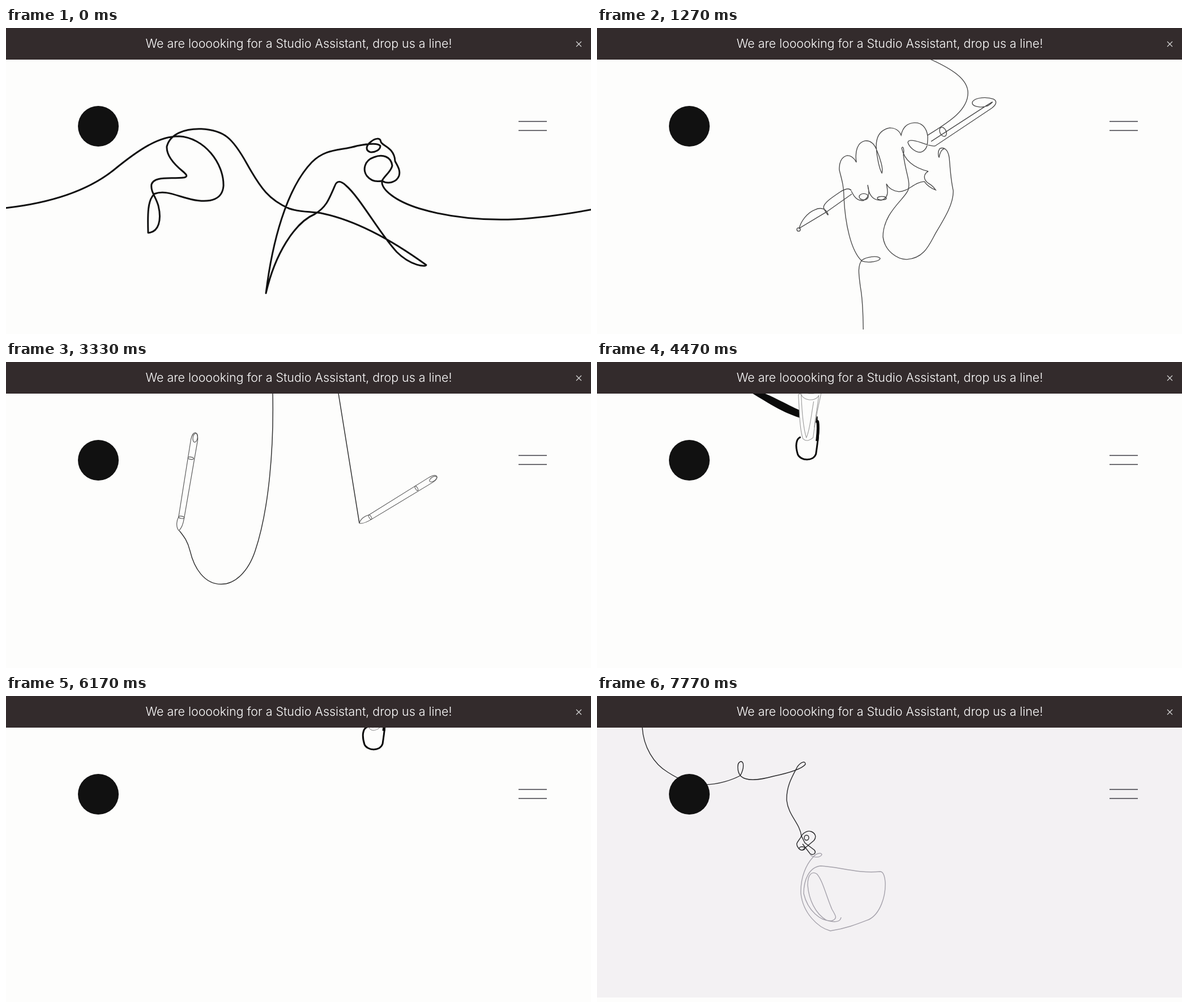
An HTML page for the animation above (7.83 s loop, 1033x542 px).

```html
<!DOCTYPE html>
<html lang="en">
<head>
<meta charset="utf-8">
<title>Studio page</title>
<style>
  html, body { margin: 0; height: 100%; overflow: hidden; background: #fdfdfc; }
  svg { display: block; width: 100%; height: 100%; fill: none; }
  text { font: 300 21.4px Inter, "Open Sans", sans-serif; fill: #fff; text-anchor: middle; }
  #hero { stroke: #111; stroke-width: 3; stroke-linejoin: round; }
  #hand { stroke: #484848; stroke-width: 1.35; }
  #pens { stroke: #333; stroke-width: 1.5; }
  #pencil { stroke: #555; stroke-width: 1.15; }
  #brush { stroke: #999; stroke-width: 1.1; }
  #lamp { stroke: #2a2a2c; stroke-width: 1.4; }
</style>
</head>
<body>
<svg viewBox="0 0 1033 542">
  <defs>
    <clipPath id="view"><rect y="56" width="1033" height="478"/></clipPath>
    <clipPath id="painted"><rect id="wipe" y="-100" width="0" height="700"/></clipPath>
    <g id="pencil">
      <path d="M0,0 C-7,-7 -6,-18 -4,-24 L-4,-163 C-3,-180 7,-180 8,-163 L6,-24 C6,-14 4,-4 0,0"/>
      <ellipse cx="3" cy="-167" rx="4" ry="8"/>
      <ellipse cx="1" cy="-130" rx="5" ry="2"/>
      <ellipse cx="1" cy="-24" rx="5" ry="2"/>
    </g>
  </defs>

  <g clip-path="url(#view)">
    <rect id="paper" y="56" width="1033" height="478" fill="#f3f1f3"/>

    <path id="hero" d="M0,319 C70,311 140,292 190,252 C235,215 270,192 305,192 C350,194 385,240 384,280
      C382,305 360,308 340,306 C310,303 285,285 262,294 C250,305 250,330 251,363
      C270,362 275,340 269,315 C264,298 255,290 257,277 C262,262 290,268 315,265
      C322,263 318,259 312,254 C295,240 283,225 284,210 C290,188 315,178 345,179
      C385,181 400,195 425,240 C450,285 465,305 500,320 C520,327 540,325 560,329
      C620,342 680,375 742,420 C742,424 715,422 690,397 C660,365 625,300 600,279
      C590,270 584,271 581,279 C570,305 565,318 545,330 C510,345 475,400 459,470
      C470,380 495,285 540,238 C565,213 590,218 620,209 C640,205 657,204 661,209
      C661,216 652,221 643,220 C634,217 636,208 644,202 C652,195 661,194 662,202
      C664,209 686,212 687,236 C691,244 697,252 694,262 C690,273 675,278 664,271
      C668,262 680,255 682,244 C680,228 665,223 650,229 C632,235 630,252 637,262
      C645,272 655,273 664,271 C662,285 685,306 730,320 C790,338 850,341 900,339
      C950,336 1000,328 1033,322"/>

    <g id="hand">
      <path d="M-10,-60 C200,-50 480,0 590,56 C625,72 655,90 655,115 C655,148 615,170 584,190"/>
      <path d="M590,201 L690,136 C702,128 700,131 690,138 C675,143 660,138 663,131
        C668,122 690,122 700,126 C708,130 704,137 697,142 L597,209 C590,210 580,206 572,203
        C555,197 549,199 549,203 C552,212 563,221 572,220 C584,216 584,205 584,192
        C582,175 572,167 560,168 C545,169 539,180 537,190 C533,180 524,177 517,177
        C500,180 493,192 493,210 C494,230 499,250 503,257 C506,250 500,230 493,214
        C488,203 481,199 473,200 C460,203 455,218 458,238 C454,230 449,226 442,226
        C431,228 427,240 428,252 C432,268 436,280 436,300 C438,345 448,395 468,413
        C480,417 500,413 500,408 C494,402 475,406 468,411 C459,422 463,440 465,458
        C471,490 470,540 471,596"/>
      <ellipse cx="611" cy="184" rx="5.5" ry="8.5" transform="rotate(-25 611 184)"/>
      <path d="M585,254 C560,248 543,235 538,213 C540,207 543,215 541,225 C546,260 553,270 550,285
        C548,300 505,325 505,370 C508,395 530,410 547,410 C580,408 588,380 600,360
        C615,335 630,310 629,288 C624,265 624,250 622,230 C620,215 612,210 605,214
        C601,220 603,228 604,229 C606,219 609,215 613,214"/>
      <path d="M585,254 C577,258 575,268 585,275 C592,279 596,284 598,287 C587,283 582,278 578,272
        C560,273 550,290 533,290 C520,288 514,282 511,276 C514,290 515,300 503,305
        C490,306 480,300 478,278 C481,290 482,300 470,306 C455,306 452,293 449,289"/>
      <ellipse cx="471" cy="299" rx="8" ry="5.5"/>
      <ellipse cx="503" cy="301.500" rx="8" ry="3"/>
      <path d="M449,288 C445,282 435,287 430,290 C415,300 400,310 400,318 C403,326 409,334 408,330
        C405,320 395,317 385,322 C370,328 360,343 357,355 L405,326 L450,294"/>
      <circle cx="356" cy="357" r="3"/>
    </g>

    <g id="pens">
      <path d="M471,56 C473,150 465,260 440,335 C427,374 403,394 380,394 C350,394 332,365 325,335
        C320,315 312,307 306,299 M587,56 L624,286"/>
      <use href="#pencil" transform="translate(305 299) rotate(9)"/>
      <use href="#pencil" transform="translate(624 286) rotate(58) scale(.91)"/>
    </g>

    <g id="paint">
      <path id="guide" d="M150,-20 C190,5 240,32 286,56 C335,82 355,95 398,105 S470,124 512,135
        S575,155 626,202 S660,260 668,295"/>
      <path clip-path="url(#painted)" fill="#0a0a0a" d="M152,-22 C200,5 250,35 297,56 C340,75 355,88 395,98
        S470,120 512,132 S575,152 627,201 S661,260 669,295 L667,295 C660,262 640,218 625,203
        C595,174 575,163 540,147 S460,127 400,111 S330,90 275,56 L148,-18 Z"/>
      <g id="brush">
        <path fill="#fdfdfc" d="M629,-300 L628,200 C630,228 635,240 642,244 L634,250
          C636,280 636,310 642,328 C648,334 656,330 660,326 C663,300 670,265 676,240
          C692,165 700,110 704,56 L716,-300"/>
        <path d="M639,250 C640,275 643,310 648,326 C654,315 656,290 661,262
          M638,246 C640,262 665,263 670,251 C668,270 664,290 662,308
          M638,250 C640,236 655,240 660,243 S670,243 674,240 M642,244 C650,250 664,249 672,244"/>
        <g stroke="#0a0a0a">
          <path stroke-width="3" d="M668,295 C671,315 668,335 665,355 C660,369 638,367 633,356
            C628,340 630,328 638,325"/>
          <path stroke-width="5" d="M668,297 C670,310 668,322 667,332"/>
        </g>
      </g>
    </g>

    <g id="lamp">
      <path id="swirl" pathLength="1" d="M104,30 C108,70 125,95 155,95 C180,95 193,75 194,50
        C196,10 215,20 235,56 C260,100 295,132 323,132 C350,132 362,105 350,91"/>
      <path id="cord" pathLength="1" d="M350,91 C335,70 300,75 270,110 S130,150 100,190 S78,230 80,256
        C82,290 100,320 125,335 C145,348 165,357 190,357 C215,357 240,348 253,341
        C260,328 260,316 254,316 C246,318 248,334 253,341 C264,353 290,348 312,342
        C340,336 362,329 368,321 C368,314 360,317 354,325 C345,342 334,360 335,385
        C338,412 358,425 361,448"/>
      <path id="socket" pathLength="1" d="M361,448 C365,441 373,438 378,440 C386,443 388,450 383,456
        L364,472 C357,476 352,464 353,461 C355,456 359,453 361,448 L367,460 L384,473
        C388,479 381,483 376,479 L363,462
        M374,451 A4,4.500 0 1 0 366,451 A4,4.500 0 1 0 374,451
        M367,470 A5,3 0 1 0 357,470 A5,3 0 1 0 367,470"/>
      <path id="shade" pathLength="1" stroke="#a5a2ab" d="M376,480 C380,487 394,487 397,481
        C396,476 386,479 381,486 C370,498 359,520 360,550 C364,585 390,610 412,616
        C440,612 462,603 480,596 C500,586 510,555 509,530 C508,518 505,511 500,511
        C460,515 425,502 395,501 C375,503 365,525 365,550 C372,580 395,600 415,598
        C425,594 422,590 415,578 C405,555 398,525 388,515 C380,510 372,515 372,535
        C374,560 385,585 405,597 C420,602 430,600 431,592"/>
    </g>
  </g>

  <rect width="1033" height="56" fill="#332b2c"/>
  <text x="517" y="34.500">We are looooking for a Studio Assistant, drop us a line!</text>
  <path stroke="#ddd" stroke-width="1.1" d="M1007,24 l9,9 m0,-9 l-9,9"/>
  <circle cx="163" cy="174" r="36" fill="#111"/>
  <path stroke="#3a3840" stroke-width="1.3" d="M905,165.500 h50 M905,181.500 h50"/>
</svg>
<script>
const LOOP = 7830;
const $ = id => document.getElementById(id);
const guide = $('guide'), guideLength = guide.getTotalLength();
const guideEnd = guide.getPointAtLength(guideLength);

// Linear interpolation through [time, value] keys, held at both ends.
function track(t, keys) {
  if (t <= keys[0][0]) return keys[0][1];
  for (let i = 1; i < keys.length; i++) {
    const [t0, a] = keys[i - 1], [t1, b] = keys[i];
    if (t < t1) return a + (b - a) * (t - t0) / (t1 - t0);
  }
  return keys[keys.length - 1][1];
}

const SCROLL = [[0, 0], [100, 25], [400, 270], [800, 530], [1270, 640], [2230, 700],
  [2430, 730], [2800, 950], [3200, 1140], [3330, 1180], [4030, 1455], [4600, 1640]];
const PAINT = [[4030, 0], [4800, .74], [5570, 1]];
const LEAVE = [[5600, 0], [5800, -60], [6400, -400]];
const LAMP = [[6430, 80], [6730, 0], [7200, -100], [7770, -200]];
const DRAWN = { swirl: [6430, 6730], cord: [6730, 7480], socket: [7440, 7600], shade: [7500, 7770] };

const move = (id, y, x = 0) => $(id).setAttribute('transform', `translate(${x} ${y})`);

function render(t) {
  const scroll = track(t, SCROLL);
  move('hero', -scroll);
  move('hand', 640 - scroll);
  move('pens', 1180 - scroll);

  const tip = guide.getPointAtLength(track(t, PAINT) * guideLength);
  move('paint', track(t, LEAVE));
  move('brush', tip.y - guideEnd.y, tip.x - guideEnd.x);
  $('wipe').setAttribute('width', tip.x);
  $('paint').style.display = t > 4030 && t < 6430 ? '' : 'none';

  $('paper').style.opacity = track(t, [[6430, 0], [6680, 1]]);
  move('lamp', track(t, LAMP));
  for (const id in DRAWN) {
    const [from, to] = DRAWN[id];
    $(id).style.strokeDasharray = `${track(t, [[from, 0], [to, 1]])} 2`;
  }
}

function tick() {
  render(performance.now() % LOOP);
  requestAnimationFrame(tick);
}
tick();
</script>
</body>
</html>
```
